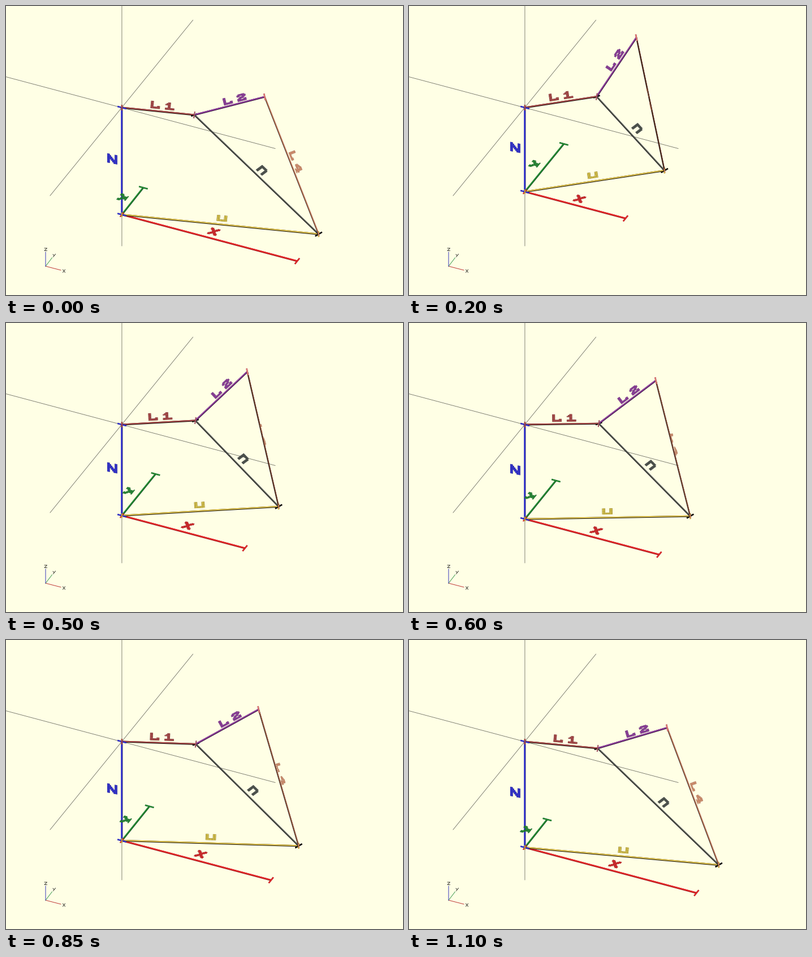
These frames come from a looping animation (702 by 512 pixels, 1150 ms). A matplotlib script:

```python
import numpy as np
import matplotlib.pyplot as plt
from matplotlib.animation import FuncAnimation
from matplotlib.collections import LineCollection, PolyCollection

W, H, DPI = 702, 512, 64
PX = 72 / DPI

# Pose index per 50 ms tick: the arm moves evenly, with a few stalls and skips.
STEPS = [22, 22, 0, 1, 2, 3, 4, 5, 6, 6, 8, 9, 11, 12, 13, 14, 14, 15, 16, 18, 18, 20, 21]

GLYPHS = {
    "L": "##     /##     /##     /##     /##     /##   ##/#######/#######",
    "1": "  ##   / ###   /####   /  ##   /  ##   /  ##   /#######/#######",
    "2": " ##### /#######/##  ###/  #### / ####  /###  ##/#######/#######",
    "4": "   ### /  #### / ##### /### ## /#######/#######/    ## /   ####",
    "X": "##   ##/### ###/ ##### /  ###  /  ###  / ##### /### ###/##   ##",
    "Y": "##   ##/##   ##/### ###/ ##### /  ###  /  ###  /  ###  / ##### ",
    "Z": "#######/#######/   ### /  ###  / ###   /###    /#######/#######",
    "U": "##   ##/##   ##/##   ##/##   ##/##   ##/#######/#######",
    "n": "###### /#######/##   ##/##   ##/##   ##/##   ##/##   ##",
}


def rgb(r, g, b):
    return np.array([r, g, b]) / 255


BLUE, RED, GREEN = rgb(52, 52, 225), rgb(240, 40, 44), rgb(38, 146, 56)
BROWN, PURPLE, YELLOW = rgb(180, 76, 76), rgb(152, 66, 168), rgb(236, 204, 76)
GRAY, SALMON, BLACK = rgb(92, 98, 94), rgb(250, 156, 120), rgb(18, 14, 12)

X_DIR = np.array([0.966, 0.258])
Y_DIR = np.array([0.63, -0.777])
UP = np.array([0.0, -1.0])
O = np.array([204.9, 180.0])

# Elbow and tip follow shallow arcs.
KEYS = [2, 8, 15, 22]
ARCS = {
    "elbow": ([331.6, 335.6, 335, 333.2], [160.5, 173, 184.3, 193]),
    "tip": ([402, 427, 446.5, 457.5], [56, 86.5, 123, 161]),
}
FITS = {k: [np.polyfit(KEYS, v, 2) for v in xy] for k, xy in ARCS.items()}


def arc(name, s):
    return np.array([np.polyval(f, s) for f in FITS[name]])


def unit(v):
    return v / np.hypot(*v)


def lerp(a, b, s):
    return np.array(a) + (np.array(b) - np.array(a)) * (s - 2) / 20


def cells(text):
    """Lit cells of a text as (column, row), centred on the origin."""
    out = []
    for n, ch in enumerate(text):
        for r, row in enumerate(GLYPHS[ch].split("/")):
            out += [(n * 11 + c, r) for c, bit in enumerate(row) if bit == "#"]
    out = np.array(out, float)
    return out - (out.max(0) + out.min(0)) / 2, np.ptp(out, axis=0) + 1


class Scene:
    def __init__(self):
        self.segs, self.widths, self.inks, self.dashes = [], [], [], []
        self.quads, self.fills = [], []

    def line(self, a, b, color, width, dash="-"):
        self.segs.append([a, b])
        self.inks.append(color)
        self.widths.append(width * PX)
        self.dashes.append(dash)

    def tube(self, a, b, color, under=None, width=3.0):
        n = unit(b - a)[::-1] * [1, -1]
        n = n if n[1] < 0 or n[0] < -0.9 else -n
        self.line(a, b, color * 0.6 if under is None else under, width)
        shift = n * width * 0.17
        self.line(a + shift, b + shift, color, width * 0.62)
        self.line(a - shift, b - shift, color * 0.6, width * 0.2, (0, (1.5, 2.5)))

    def bar(self, c, d, half, color, width=2.6):
        self.line(c - d * half, c + d * half, color * 0.6, width)
        self.line(c - d * half, c + d * half, color, width - 0.9)

    def label(self, text, c, color, u, v):
        """u spans the text width, v its height, both in pixels."""
        pts, (cols, rows) = cells(text)
        u, v = np.array(u) / cols, np.array(v) / rows
        mid = np.array(c) + pts[:, :1] * u - pts[:, 1:] * v
        for size, shade in ((1.15, 0.52), (0.74, 1.14)):
            e, f = u * size / 2, v * size / 2
            box = np.array([-e - f, e - f, e + f, -e + f])
            self.quads += list(mid[:, None] + box)
            self.fills += [np.clip(color * shade, 0, 1)] * len(mid)


def build(s):
    sc = Scene()
    base = np.array([O[0], 325 + 2.03 * s])
    x_end = base + (164.8 + 6.6 * s) * np.array([1, 0.2655])
    y_vec = np.array([72 - 1.55 * s, -88.5 + 1.85 * s])
    y_end, hand = base + y_vec, x_end + y_vec
    elbow, tip = arc("elbow", s), arc("tip", s)

    light = np.clip((s - 4) / 18, 0, 1)
    rod = rgb(100, 46, 34) * (1 - light) + rgb(222, 132, 100) * light

    # dimension ends
    sc.bar(hand, unit(np.array([0.86, -0.5])), 7, BLACK)
    sc.bar(hand, UP, 5, YELLOW)
    sc.bar(elbow, unit(np.array([0.86, -0.3])), 6, BLACK)

    sc.tube(base, y_end, GREEN)
    sc.tube(base, x_end, RED, RED * 0.7)
    sc.tube(base, hand, YELLOW, BLACK)
    sc.tube(O, base, BLUE)
    sc.tube(O, elbow, BROWN, BLACK)
    sc.tube(elbow, tip, PURPLE, rgb(50, 15, 55))
    sc.tube(elbow, hand, GRAY, BLACK, 2.6)
    sc.tube(tip, hand, rod, BLACK, 2.3)

    sc.bar(y_end, X_DIR, 8, GREEN)
    sc.bar(x_end, Y_DIR, 6.5, RED)
    for p in (O, base):
        sc.bar(p, X_DIR, 8, BLUE)
    sc.bar(O, UP, 5, BROWN)
    sc.bar(base, Y_DIR, 5, RED, 2)
    sc.bar(base, UP, 4, YELLOW, 2)
    sc.bar(elbow, unit(np.array([0.15, -1])), 6, rgb(190, 95, 115), 2)
    sc.bar(hand, unit(np.array([0.3, 1])), 3.5, SALMON, 1.8)
    sc.bar(tip, unit(np.array([0.2, 1])), 6, rgb(240, 124, 124))

    def along(text, a, b, color, shift, width, height):
        d = unit(b - a)
        n = np.array([d[1], -d[0]])
        c = (a + b) / 2 + d * shift[0] + n * shift[1]
        sc.label(text, c, color, d * width, n * height)

    along("L1", O, elbow, BROWN, lerp((2, 10.8), (7, 10.8), s), 42, 13)
    along("L2", elbow, tip, PURPLE, lerp((9, 9.6), (11.7, 9.4), s), 41, 12.5)
    k = (s - 4) / 18
    if abs(k) > 0.04:
        along("L4", tip, hand, SALMON, (-8 + 4.5 * k, 9 * k), 39, 11.5 * k)
    along("U", base, hand, YELLOW, lerp((-2, 11), (2, 11), s), 18, 10.5)
    sc.label("n", (elbow + hand) / 2 + lerp((12, -9), (10, -7.5), s), GRAY * 0.9,
             unit(hand - elbow) * 15, unit(np.array([0.8, -0.6])) * 14)
    sc.label("X", (base + x_end) / 2 + [7.5, -11], RED, X_DIR * 16, Y_DIR * 14)
    sc.label("Y", (base + y_end) / 2 + [-17, -6.5], GREEN, Y_DIR * 14, -X_DIR * 15)
    sc.label("Z", (O + base) / 2 + [-17, -4], BLUE, UP * 16, np.array([-17.5, -3.5]))
    return sc


fig = plt.figure(figsize=(W / DPI, H / DPI), dpi=DPI, facecolor="#ffffe5")
ax = fig.add_axes([0, 0, 1, 1])
ax.set(xlim=(0, W), ylim=(H, 0))
ax.axis("off")


def stroke(pts, color, width):
    ax.plot(*zip(*pts), color=color, lw=width * PX, zorder=1, snap=False)


for pts in ([(O[0], 0), (O[0], 425)], [(0, 125.5), (476, 252.5)], [(330.5, 25), (78, 336)]):
    stroke(pts, "#77776c", 0.9)

# small orientation marker
stroke([(70, 461), (97, 468)], "#c03a3a", 1)
stroke([(70, 461), (81.5, 446)], "#4aa05a", 1)
stroke([(70, 461), (70, 436)], "#4a4ac0", 1.1)
for pts in ([(68, 429), (72.5, 429), (68, 433.5), (72.5, 433.5)],
            [(100.5, 467), (104.5, 472)], [(104.5, 467), (100.5, 472)],
            [(83, 440), (85, 442)], [(87.5, 439.5), (83.5, 444.5)]):
    stroke(pts, "#33332e", 0.9)

lines = ax.add_collection(LineCollection([], zorder=2, capstyle="butt", snap=False))
blocks = ax.add_collection(PolyCollection([], zorder=3, linewidths=0, snap=False))


def draw(i):
    sc = build(STEPS[i])
    lines.set_segments(sc.segs)
    lines.set_color(sc.inks)
    lines.set_linewidth(sc.widths)
    lines.set_linestyle(sc.dashes)
    blocks.set_verts(sc.quads)
    blocks.set_facecolor(sc.fills)
    return lines, blocks


anim = FuncAnimation(fig, draw, frames=len(STEPS), interval=50, repeat=True, repeat_delay=0)
plt.show()
```
